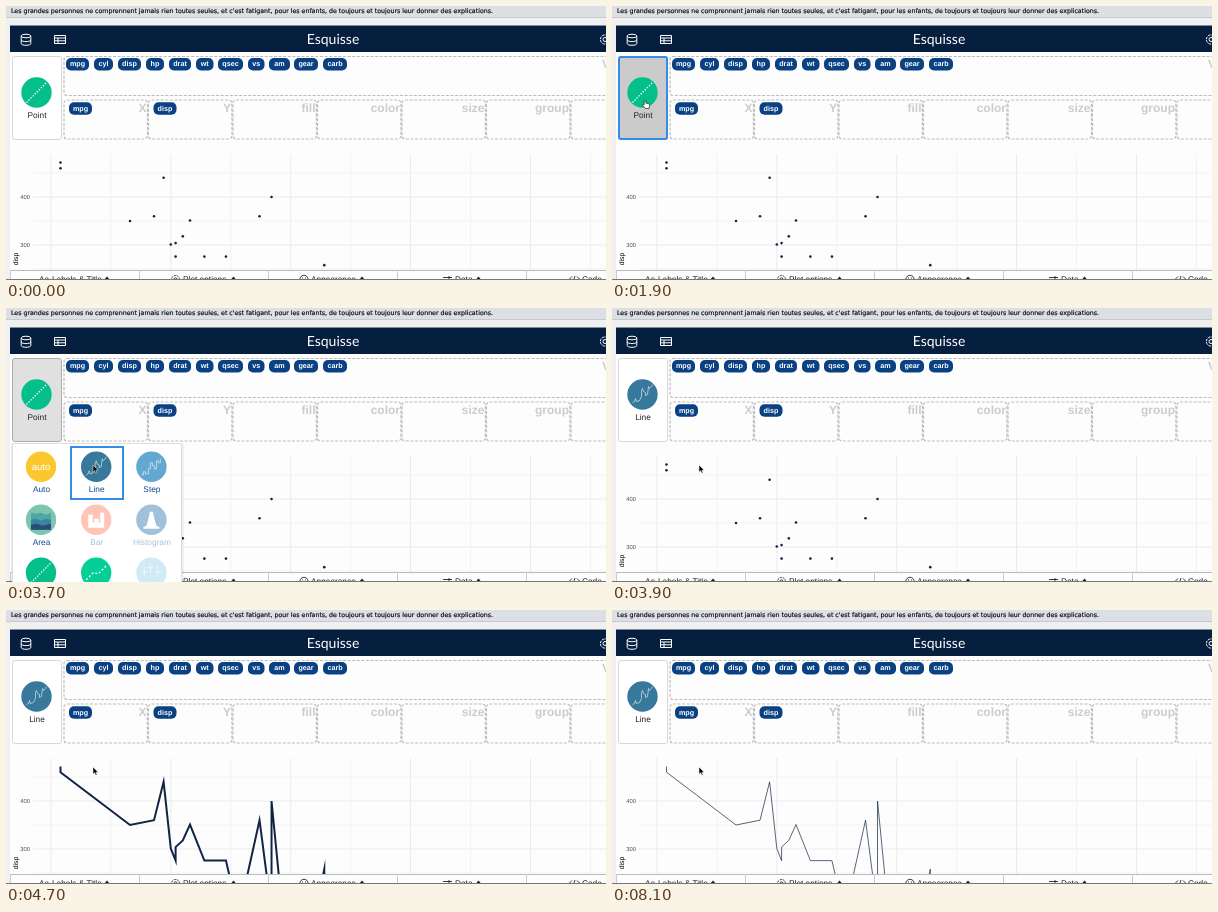
These frames come from a looping animation (600 by 274 pixels, 8.3 s). An HTML page:

```html
<!DOCTYPE html>
<html lang="fr">
<head>
<meta charset="utf-8">
<title>Esquisse</title>
<style>
html, body { margin: 0; width: 100%; height: 100%; overflow: hidden; background: #f0f0f0; }
svg { display: block; width: 600px; height: 274px; font: 8.3px "Liberation Sans", Arial, sans-serif; text-rendering: geometricPrecision; }
.mid { text-anchor: middle; }
.chip { fill: #fff; font-weight: bold; font-size: 7.2px; text-anchor: middle; }
.slot { fill: none; stroke: #bdbdbd; stroke-width: 1.2; stroke-dasharray: 3 1.6; }
.name { fill: #ccc; font-weight: bold; font-size: 12px; text-anchor: end; }
.white { fill: none; stroke: #fff; }
.sketch { fill: none; stroke: #fff; stroke-width: .7; stroke-opacity: .8; stroke-linejoin: round; }
.focus { fill: none; stroke: #348bea; stroke-width: 2; }
</style>
</head>
<body>
<svg viewBox="0 0 600 274">
  <defs>
    <g id="point"><circle r="15.2" fill="#04bf8a"/><path class="white" stroke-width="1.3" stroke-dasharray="1.4 1.5" d="M-10 10L10.5-10.5"/></g>
    <g id="line"><circle r="15.2" fill="#37789b"/><path class="sketch" d="M-10 8l2-1 1-3 1 3 3-1 2-4 0-6 1-2 1 3 2 1 0 3 2-1 1-8 1 2 2-2 1-2"/></g>
    <g id="step"><circle r="15.2" fill="#62a8d1"/><path class="sketch" d="M-10 8h2v-3h2v2h3v-5h2v-6h2v3h2v3h2v-8h2v2h2v-4"/></g>
    <g id="auto"><circle r="15.2" fill="#fac82e"/><text class="mid" y="3" fill="#fff" font-size="9.5">auto</text></g>
    <g id="area"><circle r="15.2" fill="#7cc5b0"/><path fill="#4fa7a3" d="M-10-7l5 1 5-1 5 2 5-2V10H-10Z"/><path fill="#3b83a0" d="M-10 0l5-1 5 2 5-2 5 1V10H-10Z"/><path fill="#264d78" d="M-10 5l6-1 5 2 9-2V10H-10Z"/></g>
    <g id="bar"><circle r="15.2" fill="#ff8c72"/><path fill="#fff" d="M-8-5h4.5v8H-2V-1h4.500v4H4V-7h4V8H-8Z"/></g>
    <g id="hist"><circle r="15.2" fill="#4682b4"/><path fill="#fff" d="M-8 9V7.500L-5 6-3-1-1.500-8h3L3-1 5 6 8 7.500V9Z"/></g>
    <g id="smooth"><circle r="15.2" fill="#04cf98"/><path class="white" stroke-width="1.3" stroke-dasharray="2 2" d="M-10 7L-3 0 2 1 10-7"/></g>
    <g id="box"><circle r="15.2" fill="#a5d8ea"/><path class="sketch" d="M-7-6V3M-10-1h6M-1-10V1M-4-5h6M6-7V4M3-1h6"/></g>
    <clipPath id="pane"><path d="M4 46H600V264H4Z"/></clipPath>
  </defs>

  <path fill="#dcdfe4" d="M0 0H600V11H0Z"/>
  <path stroke="#c5c8cd" d="M0 11.5H600"/>
  <text x="5" y="6.8" fill="#111" stroke="#111" stroke-width=".2" font-size="6.25" font-family="DejaVu Sans, sans-serif">Les grandes personnes ne comprennent jamais rien toutes seules, et c'est fatigant, pour les enfants, de toujours et toujours leur donner des explications.</text>
  <path fill="#fdfdfd" d="M4 19H600V274H4Z"/>
  <path fill="#061f3f" d="M4 19.5H600V46H4Z"/>
  <text class="mid" x="327" y="38.3" fill="#fff" font-size="14" font-family="Lato, sans-serif">Esquisse</text>
  <g class="white">
    <ellipse cx="20" cy="30" rx="4.8" ry="1.8"/>
    <path d="M15.2 30v7.5c0 2.4 9.6 2.4 9.6 0V30M15.2 33.8c0 2.4 9.6 2.4 9.6 0"/>
    <path d="M48.5 29.5h11v8h-11zM48.5 32h11M48.5 34.8h11M52 32v5.5"/>
    <circle cx="599" cy="33.5" r="4.6" stroke-dasharray="2.6 1"/><circle cx="599" cy="33.5" r="2"/>
  </g>

  <g id="fields"></g>
  <g clip-path="url(#pane)">
    <g id="grid"></g>
    <g id="dots" fill="#112446"></g>
    <path id="curve" fill="none" stroke="#112446" stroke-miterlimit="10"/>
  </g>
  <text class="mid" font-size="6.8" transform="translate(12 253) rotate(-90)">disp</text>
  <g id="tabs" fill="#222"></g>

  <rect id="button" x="6.5" y="50.5" width="49" height="83" rx="2.5"/>
  <rect id="buttonFocus" class="focus" x="7" y="51" width="48" height="82" rx="2"/>
  <use id="icon" x="30.5" y="86.5"/>
  <text id="label" class="mid" x="31" y="112" fill="#222"></text>

  <g id="menu">
    <path fill="#0001" d="M5 136H177.500V274H5Z"/>
    <path fill="#fff" stroke="#ddd" d="M6.5 280V135.5H175.5V280"/>
    <g id="items" fill="#0b4a8c"></g>
    <rect id="lineFocus" class="focus" x="65" y="139" width="52" height="52"/>
  </g>
  <path id="arrow" fill="#000" stroke="#fff" stroke-width=".5" d="M0 0V7.2L1.7 5.7 2.8 8.2 4 7.7 2.9 5.2H5.2Z"/>
  <path id="hand" fill="#fff" stroke="#222" stroke-width=".7" d="M-.8.6Q0-.6.8.6V3l3 .8q1 .4.8 1.6L4 8.5H.4L-2.5 5q-.2-1.2 1.7-.4Z"/>
</svg>
<script>
const $ = id => document.getElementById(id);
const px = mpg => 54.5 + (mpg - 10.4) * 23.98;
const py = disp => 191 - (disp - 400) * .48;

function chip(x, y, w, text) {
  return `<rect x="${x}" y="${y}" width="${w}" height="12.5" rx="5" fill="#0a4183"/>
    <text class="chip" x="${x + w / 2}" y="${y + 8.4}">${text}</text>`;
}

const columns = [["mpg", 60, 23], ["cyl", 88, 19], ["disp", 112, 23], ["hp", 140, 18], ["drat", 163, 22],
  ["wt", 190, 17.5], ["qsec", 212, 25], ["vs", 242, 16.5], ["am", 263, 21], ["gear", 288, 24], ["carb", 317, 24]];
const slots = ["X", "Y", "fill", "color", "size", "group", ""];
$("fields").innerHTML =
  `<rect class="slot" x="58" y="50.5" width="560" height="39" rx="3"/>
   <text class="name" x="596" y="62" style="text-anchor:start">V</text>` +
  columns.map(([name, x, w]) => chip(x, 52, w, name)).join("") +
  slots.map((name, i) => {
    const x = 58 + i * 84.5;
    return `<rect class="slot" x="${x}" y="94" width="83.4" height="39" rx="3"/>
      <text class="name" x="${x + 82.5}" y="106">${name}</text>`;
  }).join("") +
  chip(63, 96.2, 23, "mpg") + chip(147.5, 96.2, 23, "disp");

let grid = "";
for (let mpg = 10; mpg < 33; mpg += 2.5)
  grid += `<path stroke="#ebebeb" stroke-width="${mpg % 5 ? .6 : 1}" d="M${px(mpg)} 148V264"/>`;
for (let disp = 450; disp >= 250; disp -= 50) {
  const major = disp % 100 === 0;
  grid += `<path stroke="#ebebeb" stroke-width="${major ? 1 : .6}" d="M27 ${py(disp)}H600"/>`;
  if (major) grid += `<text x="24" y="${py(disp) + 2.1}" text-anchor="end" font-size="5.8" fill="#4d4d4d">${disp}</text>`;
}
$("grid").innerHTML = grid;

// mtcars, ordered by mpg
const cars = [[10.4, 472], [10.4, 460], [13.3, 350], [14.3, 360], [14.7, 440], [15, 301], [15.2, 275.8],
  [15.2, 304], [15.5, 318], [15.8, 351], [16.4, 275.8], [17.3, 275.8], [17.8, 167.6], [18.1, 225],
  [18.7, 360], [19.2, 167.6], [19.2, 400], [19.7, 145], [21, 160], [21.4, 258], [21.4, 121]]
  .map(([mpg, disp]) => [px(mpg), py(disp)]);
$("dots").innerHTML = cars.map(([x, y]) => `<circle cx="${x}" cy="${y}" r="1.3"/>`).join("");
$("curve").setAttribute("d", "M" + cars.join("L"));

const tabs = [["Labels &amp; Title", 46, 101], ["Plot options", 177, 227.5], ["Appearance", 305, 356],
  ["Data", 449, 472.5], ["Code", 576, 602]];
$("tabs").innerHTML = `<path fill="#fdfdfd" d="M4 264H600V274H4Z"/><path stroke="#bbb" d="M4 264.5H600"/>` +
  tabs.map(([name, x, up], i) =>
    `<path stroke="#ccc" d="M${4.5 + i * 129} 264V274"/><text x="${x}" y="276.3">${name}</text>
     <path d="M${up - 3} 274l3-3.5 3 3.5z"/>`).join("") +
  `<text x="33" y="276.3">Aa</text>
   <g fill="none" stroke="#222" stroke-width=".9">
     <circle cx="169.5" cy="273.5" r="4" stroke-dasharray="2 .8"/><circle cx="169.5" cy="273.5" r="1.6"/>
     <circle cx="298" cy="273.5" r="4.2"/><path d="M296 272h1M299 272h1"/>
     <path d="M437 271.5h9M437 274.5h9M443 270v3M566 270.5l-3 3 3 3M569 270l-2 6M571 270.5l3 3-3 3"/>
   </g>
   <path stroke="#777" d="M0 273.5H600"/>`;

const items = [["auto", "Auto"], ["line", "Line"], ["step", "Step"], ["area", "Area"], ["bar", "Bar", 1],
  ["hist", "Histogram", 1], ["point", "Point"], ["smooth", "Smooth"], ["box", "Boxplot", 1]];
$("items").innerHTML = items.map(([icon, name, off], i) => {
  const x = 35 + i % 3 * 55.2, y = 158.8 + Math.floor(i / 3) * 53;
  return `<use href="#${icon}" x="${x}" y="${y}" opacity="${off ? .5 : 1}"/>
    <text class="mid" x="${x + .5}" y="${y + 25.3}" opacity="${off ? .35 : 1}">${name}</text>`;
}).join("");

// pointer path: time, x, y
const path = [[100, 300, 262], [200, 160, 176], [300, 160, 176], [600, 88, 106], [700, 88, 106],
  [1300, 33, 94], [2600, 33, 94], [3200, 87, 157], [8300, 87, 157]];
function pointer(t) {
  const i = Math.max(1, path.findIndex(k => k[0] >= t));
  const [t0, x0, y0] = path[i - 1], [t1, x1, y1] = path[i];
  const u = (t - t0) / (t1 - t0), e = u * u * (3 - 2 * u);
  return [x0 + (x1 - x0) * e, y0 + (y1 - y0) * e];
}

const show = (id, on) => $(id).style.display = on ? "" : "none";

function draw(now) {
  const t = Math.floor(now % 8300 / 100) * 100;
  const [x, y] = pointer(t);
  const open = t >= 2000 && t < 3800, picked = t >= 3800, lines = t >= 4200;
  const over = t >= 100 && x < 56 && y < 134;

  $("button").setAttribute("fill", over ? "#cbcbcb" : open ? "#e0e0e0" : "#fff");
  $("button").setAttribute("stroke", over || open ? "#adadad" : "#d8d8d8");
  $("icon").setAttribute("href", picked ? "#line" : "#point");
  $("label").textContent = picked ? "Line" : "Point";
  show("buttonFocus", t >= 1800 && t < 2000);
  show("menu", open);
  show("lineFocus", t >= 3600);

  show("dots", !lines);
  show("curve", lines);
  $("curve").setAttribute("stroke-width", t < 4800 ? 2 : .7);

  show("hand", over);
  show("arrow", t >= 100 && !over);
  for (const id of ["hand", "arrow"]) $(id).setAttribute("transform", `translate(${x} ${y})`);
  requestAnimationFrame(() => draw(performance.now()));
}
draw(performance.now());
</script>
</body>
</html>
```
